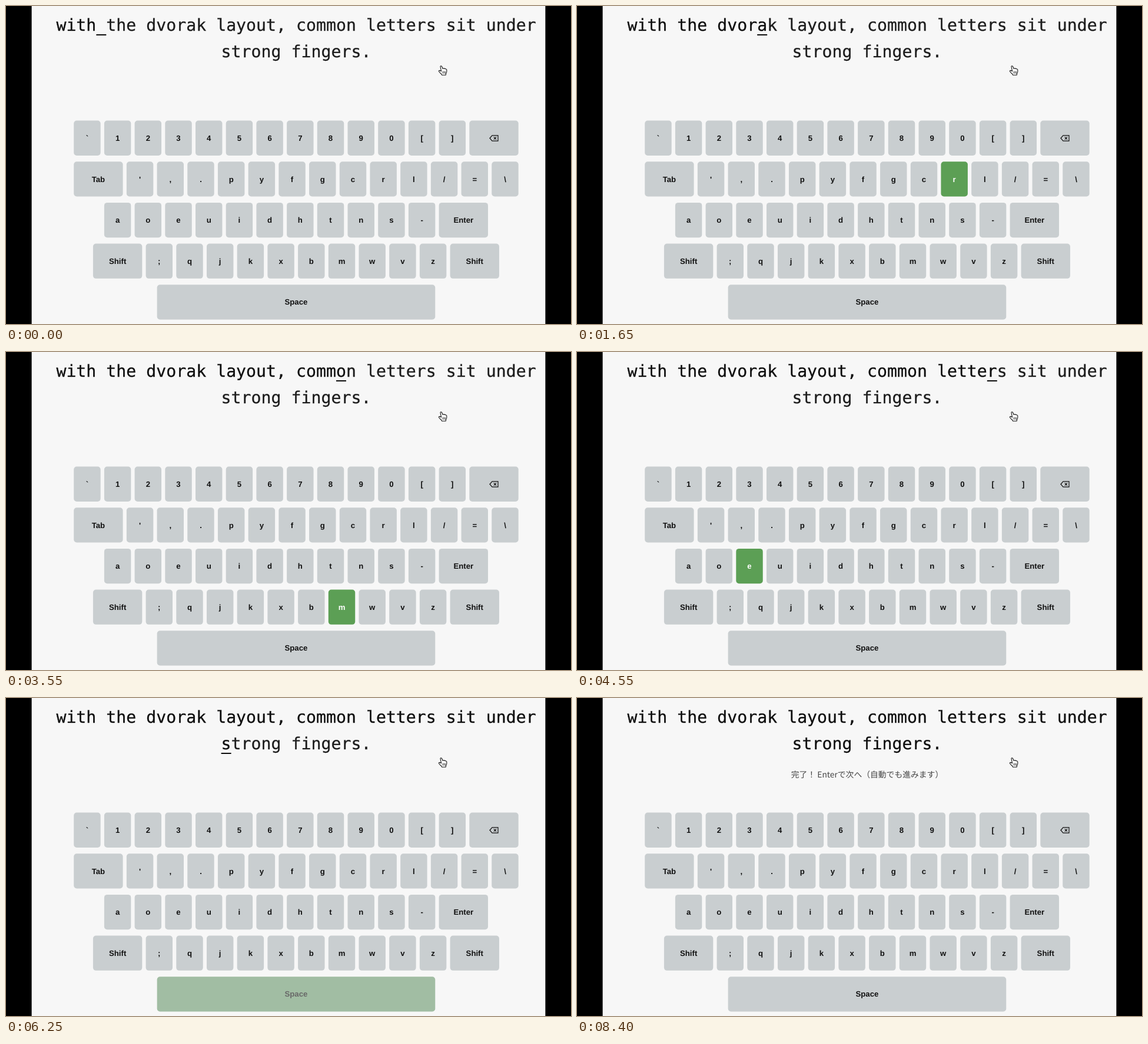
Write an HTML page that moves like this. It is 960 px wide and 540 px high and loops after 8.5 s.

```html
<!DOCTYPE html>
<html lang="en">
<head>
<meta charset="utf-8">
<style>
  html, body { margin: 0; width: 100%; height: 100%; overflow: hidden; background: #000; }
  svg { position: absolute; left: 0; top: 0; }
  svg text { text-anchor: middle; text-rendering: geometricPrecision; }
  .label { font: bold 13.2px "Liberation Sans", Arial, sans-serif; }
  #done { font: 13.8px "Noto Sans CJK JP", "Noto Sans CJK", sans-serif; fill: #444; }
  .line {
    position: absolute; white-space: pre; color: #1c1c1c; -webkit-text-stroke: .3px;
    font: 28.2px/45px "DejaVu Sans Mono", monospace; text-rendering: geometricPrecision;
  }
  .typed { color: #0d0d0d; }
  .current { color: #0d0d0d; text-decoration: underline 2px; text-underline-offset: 6px; }
</style>
</head>
<body>
<svg width="960" height="540" viewBox="0 0 960 540">
  <rect x="43.6" width="872.8" height="540" fill="#f7f7f7"/>
  <g id="keys"></g>
  <path d="M822 224.5L826 219.9H836V229.2H826ZM828.8 222.4l4.2 4.2m0-4.2l-4.2 4.2" fill="none" stroke="#111" stroke-width="1.2"/>
  <text id="done" x="493" y="135" lang="ja">完了！ Enterで次へ（自動でも進みます）</text>
  <g stroke="#111" stroke-linejoin="round" stroke-linecap="round">
    <path fill="#fff" stroke-width="1.1" d="M738 103Q738.4 101 740.3 102.2L742.2 106.4Q743.6 105.2 744.6 106.5Q746 105.5 746.8 107Q748.4 106.6 748.8 108.4Q749.3 112 747.6 114.4L747.2 117.2H740.4L740 115.8Q737.6 114 735.6 111.2Q735 109.4 737 109.4L739.6 110.8Z"/>
    <path fill="none" stroke-width=".8" d="M742.2 111v3.4M744.3 111v3.4M746.3 111v3.4"/>
  </g>
</svg>
<div class="line" style="left:85.4px;top:10px"></div>
<div class="line" style="left:365.6px;top:55px"></div>
<script>
const LOOP = 8500, START = 4;
const LINES = ['with the dvorak layout, common letters sit under ', 'strong fingers.'];
const TEXT = LINES.join('');

// Typing comes in steady bursts, split by pauses
const BURSTS = [
  { typed: ' th', at: 40, step: 100 },
  { typed: 'e d', at: 460, step: 155 },
  { typed: 'vorak layout, ', at: 1390, step: 113 },
  { typed: 'comm', at: 3090, step: 143 },
  { typed: 'on ', at: 3790, step: 50 },
  { typed: 'letters', at: 4140, step: 92 },
  { typed: ' sit', at: 5095, step: 110 },
  { typed: ' under', at: 5590, step: 60 },
  { typed: ' ', at: 6240, step: 0 },
  { typed: 'st', at: 6540, step: 50 },
  { typed: 'ron', at: 6890, step: 60 },
  { typed: 'g', at: 7190, step: 0 },
  { typed: ' fingers.', at: 7440, step: 102 }
];
const presses = BURSTS.flatMap(({ typed, at, step }) =>
  [...typed].map((char, i) => ({ char, time: at + i * step })));

const ROWS = [
  [..."`1234567890[]", ''],
  ['Tab', ..."',.pyfgcrl/=\\"],
  [...'aoeuidhtns-', 'Enter'],
  ['Shift', ...';qjkxbmwvz', 'Shift'],
  ['Space']
];
const KEY_W = 45.45, WIDE_W = 83.4, SPACE_W = 472.6, GAP = 6.25, KEY_H = 59.3, ROW_H = 69.65, CENTER = 492.95;
const GREY = [201, 206, 208], GREEN = [92, 159, 85], INK = [17, 17, 17], WHITE = [255, 255, 255];

const $ = id => document.getElementById(id);
const clamp = v => Math.max(0, Math.min(1, v));
const mix = (a, b, k) => `rgb(${a.map((v, i) => Math.round(v + (b[i] - v) * k))})`;

function add(tag, attrs) {
  const el = document.createElementNS('http://www.w3.org/2000/svg', tag);
  for (const name in attrs) el.setAttribute(name, attrs[name]);
  return $('keys').appendChild(el);
}

const keyWidth = name => name === 'Space' ? SPACE_W : name.length === 1 ? KEY_W : WIDE_W;
const keys = [];
ROWS.forEach((row, r) => {
  const total = row.reduce((sum, name) => sum + keyWidth(name) + GAP, -GAP);
  let x = CENTER - total / 2;
  const y = 194.6 + r * ROW_H;
  for (const name of row) {
    const width = keyWidth(name);
    const box = add('rect', { x, y, width, height: KEY_H, rx: 5 });
    const label = add('text', { class: 'label', x: x + width / 2, y: y + KEY_H / 2 + 4.6 });
    label.textContent = name;
    keys.push({ char: name === 'Space' ? ' ' : name, box, label });
    x += width + GAP;
  }
});

const letters = [...document.querySelectorAll('.line')].flatMap((line, i) =>
  [...LINES[i]].map(char => {
    const span = line.appendChild(document.createElement('span'));
    span.textContent = char;
    return span;
  }));

// Quick fade in, short hold, fade out; the next press releases the key early
function glow(i, t) {
  const { time } = presses[i];
  const next = presses[i + 1]?.time ?? LOOP;
  const release = Math.min(time + 70, next);
  return Math.min(clamp((t - time) / 30), clamp((release + 40 - t) / 40));
}

function draw() {
  const t = performance.now() % LOOP;
  const cursor = START + presses.filter(p => p.time <= t).length;
  letters.forEach((span, i) => {
    span.className = i < cursor ? 'typed' : i === cursor ? 'current' : '';
  });
  const lit = {};
  presses.forEach(({ char }, i) => {
    lit[char] = Math.max(lit[char] || 0, glow(i, t));
  });
  for (const { char, box, label } of keys) {
    const k = lit[char] || 0;
    box.setAttribute('fill', mix(GREY, GREEN, k));
    label.setAttribute('fill', mix(INK, WHITE, k));
  }
  $('done').style.visibility = cursor >= TEXT.length ? 'visible' : 'hidden';
  requestAnimationFrame(draw);
}
draw();
</script>
</body>
</html>
```
